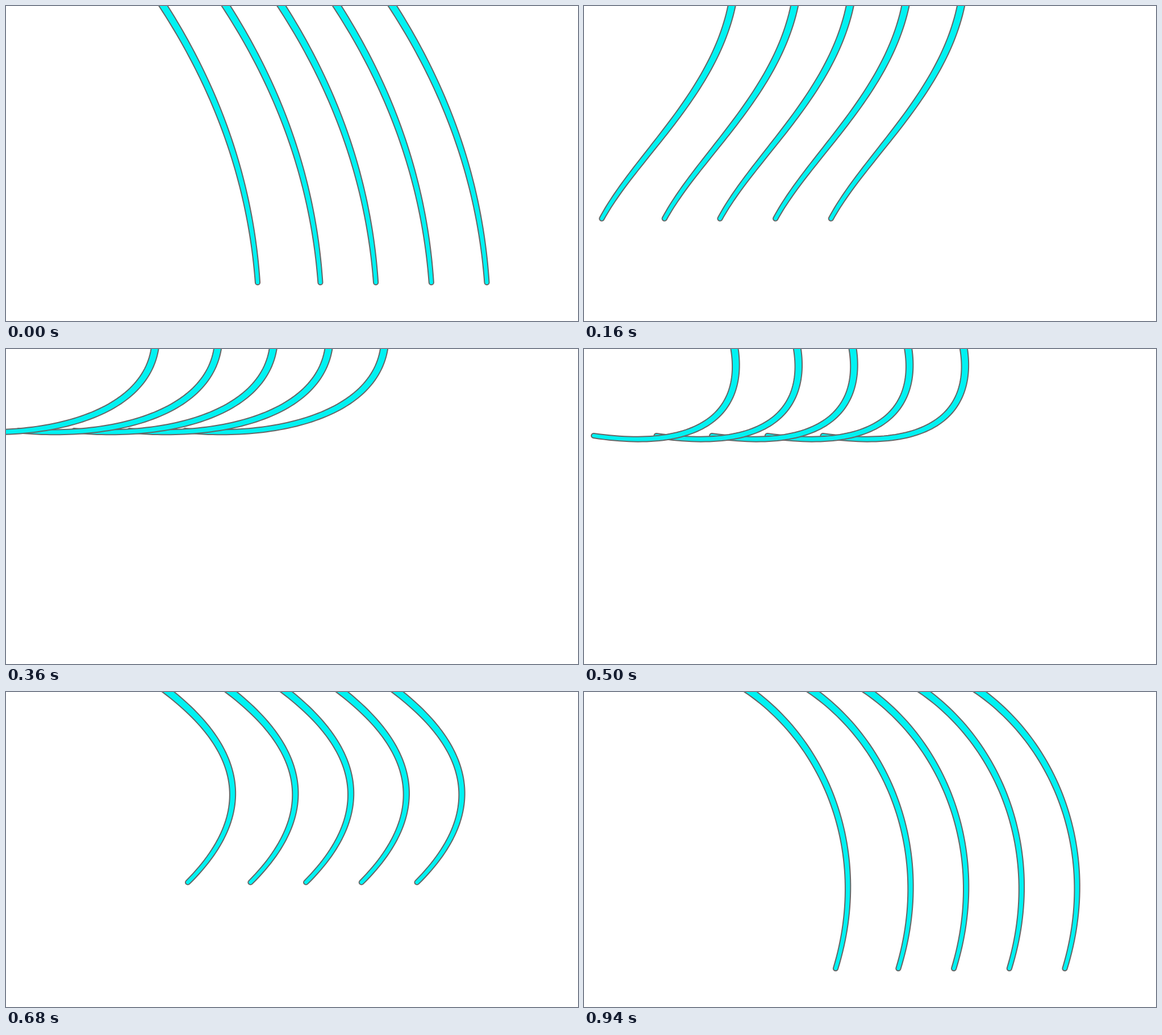
These frames come from a looping animation (1007x556 px, 0.96 s). An HTML page with a canvas:

```html
<!DOCTYPE html>
<html lang="en">
<head>
<meta charset="utf-8">
<title>Swaying strands</title>
<style>
  html, body { margin: 0; width: 100%; height: 100%; overflow: hidden; background: #fff; }
  canvas { display: block; width: 1007px; height: 556px; }
</style>
</head>
<body>
<canvas id="stage" width="1007" height="556"></canvas>
<script>
const ctx = document.getElementById('stage').getContext('2d');
const LOOP = 960, STEP = 20, STRANDS = 5, SEGMENTS = 60;
const ROOT_HALF = 6.5, TIP_HALF = 4.1;

// Each pose is one cubic curve: time, root x, two handles, tip
const POSES = [
  [0,   277, 376, 154, 431, 317, 443, 488],
  [80,  261, 251, 183, 228, 365, 223, 548],
  [240, 262, 230, 128, 20,  173, -91, 211],
  [500, 265, 282, 111, 208, 181, 17,  153],
  [680, 286, 414, 100, 444, 212, 320, 336],
  [800, 285, 412, 112, 478, 214, 494, 302],
  [840, 285, 412, 121, 481, 231, 491, 331],
  [940, 294, 430, 98,  504, 288, 443, 488]
];

// Speed of value c at pose i, taken from its neighbours
function speed(i, c) {
  const a = POSES[Math.max(0, i - 1)], b = POSES[Math.min(POSES.length - 1, i + 1)];
  return (b[c] - a[c]) / (b[0] - a[0]);
}

function poseAt(t) {
  const i = Math.max(0, POSES.findIndex(p => p[0] >= t) - 1);
  const a = POSES[i], b = POSES[i + 1], d = b[0] - a[0];
  const s = (t - a[0]) / d, r = 1 - s;
  return a.map((v, c) =>
    v * (1 + 2 * s) * r * r + b[c] * (1 + 2 * r) * s * s +
    d * s * r * (speed(i, c) * r - speed(i + 1, c) * s));
}

const cubic = (a, b, c, d, u) => {
  const v = 1 - u;
  return v * v * v * a + 3 * u * v * v * b + 3 * u * u * v * c + u * u * u * d;
};

// Tapered outline with a round tip; it starts a little above the stage
function outline([, ax, bx, by, cx, cy, dx, dy]) {
  const path = new Path2D(), right = [];
  const at = u => [cubic(ax, bx, cx, dx, u), cubic(0, by, cy, dy, u)];
  for (let i = -3; i <= SEGMENTS; i++) {
    const u = i / SEGMENTS, [x, y] = at(u);
    const [x0, y0] = at(u - 0.001), [x1, y1] = at(u + 0.001);
    const angle = Math.atan2(y1 - y0, x1 - x0);
    const half = ROOT_HALF + (TIP_HALF - ROOT_HALF) * u;
    const nx = -Math.sin(angle) * half, ny = Math.cos(angle) * half;
    path.lineTo(x + nx, y + ny);
    right.unshift([x - nx, y - ny]);
    if (i === SEGMENTS) path.arc(x, y, half, angle + Math.PI / 2, angle - Math.PI / 2, true);
  }
  right.forEach(q => path.lineTo(...q));
  path.closePath();
  return path;
}

function draw(t) {
  const path = outline(poseAt(t));
  ctx.fillStyle = '#fff';
  ctx.fillRect(0, 0, 1007, 556);
  ctx.fillStyle = '#00f2f2';
  ctx.strokeStyle = '#666';
  ctx.lineWidth = 2;
  ctx.lineJoin = 'round';
  // The leftmost strand lies on top
  for (let k = STRANDS - 1; k >= 0; k--) {
    ctx.save();
    ctx.translate(k ? 12.7 + 97.7 * k : 0, 0);
    ctx.fill(path);
    ctx.stroke(path);
    ctx.restore();
  }
}

const start = performance.now();
function tick() {
  const t = (performance.now() - start) % LOOP;
  draw(Math.floor(t / STEP) * STEP);
  requestAnimationFrame(tick);
}
tick();
</script>
</body>
</html>
```
